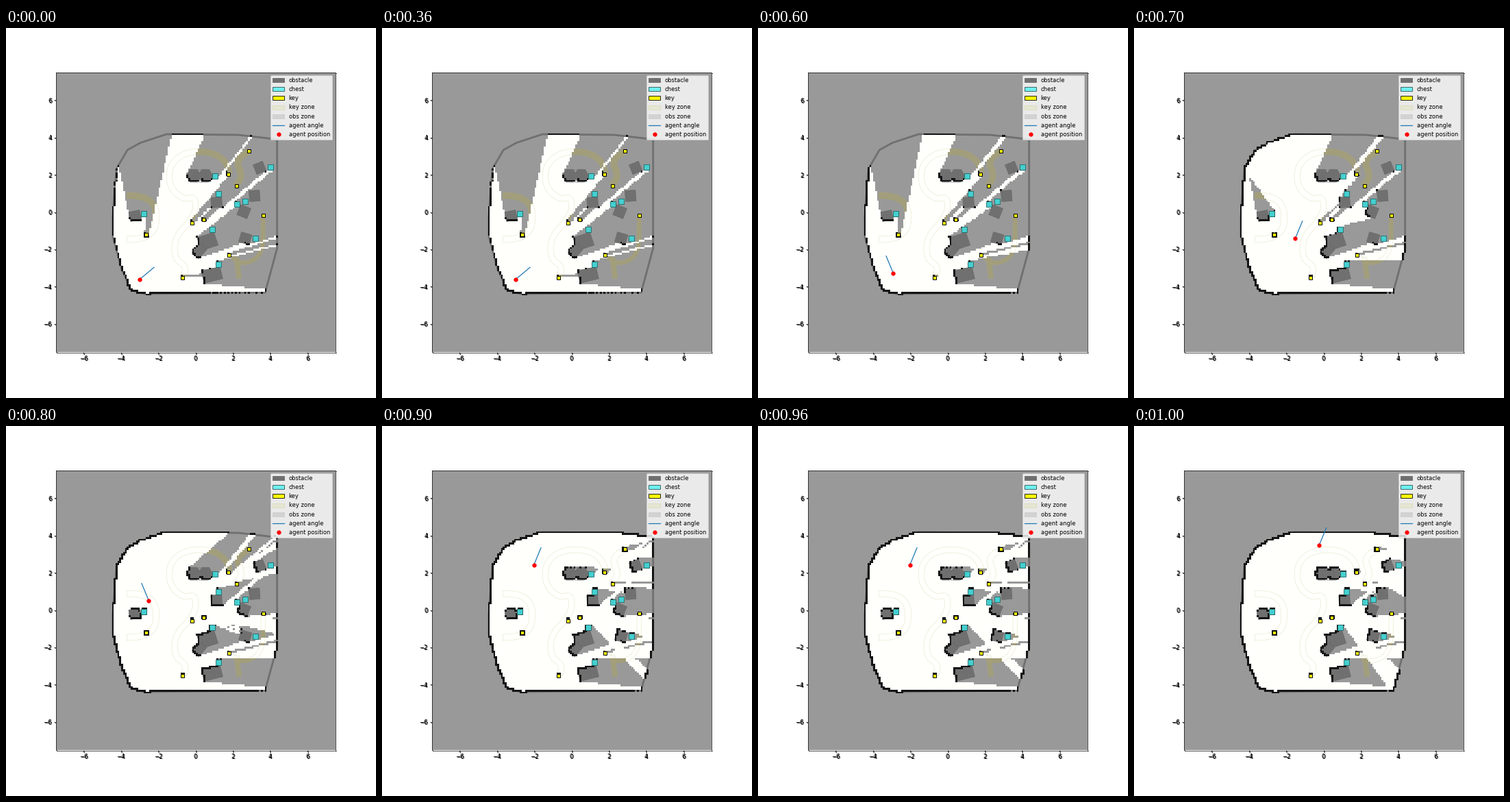
A matplotlib script that plays this animation: 540 px wide and 540 px high, repeating every 1100 ms.

```python
import numpy as np
import matplotlib.pyplot as plt
from matplotlib.animation import FuncAnimation
from matplotlib.lines import Line2D
from matplotlib.patches import Patch, Polygon
from matplotlib.path import Path

HALF, CELL, PX, N = 7.5, 0.1, 27.2, 150
GREY = "#707070"


def world(points):
    """Stage pixels to map units."""
    p = np.array(points, float)
    return np.column_stack([(p[:, 0] - 277.3) / PX, (269 - p[:, 1]) / PX])


def box(cx, cy, w, h, deg=0):
    """Turned rectangle, centre and size in stage pixels."""
    a = np.radians(deg)
    x = np.array([-1, 1, 1, -1]) * w / 2
    y = np.array([-1, -1, 1, 1]) * h / 2
    return world(np.column_stack([cx + x * np.cos(a) - y * np.sin(a),
                                  cy - x * np.sin(a) - y * np.cos(a)]))


def arc(cx, cy, rx, ry, start, end, power=1.0):
    """Points on a (super)ellipse, counter-clockwise on screen."""
    t = np.radians(np.linspace(start, end, 25))
    c, s = np.cos(t), np.sin(t)
    return list(zip(cx + rx * np.sign(c) * abs(c) ** power,
                    cy - ry * np.sign(s) * abs(s) ** power))


def hexagon(cx, cy, r):
    t = np.arange(6) * np.pi / 3
    return world(np.column_stack([cx + r * np.cos(t), cy + r * np.sin(t)]))


def band(points, width):
    """Ribbon polygon around a corner-cut path."""
    p = world(points)
    for _ in range(3):
        a, b = p[:-1], p[1:]
        cut = np.stack([0.75 * a + 0.25 * b, 0.25 * a + 0.75 * b], 1).reshape(-1, 2)
        p = np.vstack([p[:1], cut, p[-1:]])
    d = np.gradient(p, axis=0)
    d /= np.hypot(d[:, 0], d[:, 1])[:, None]
    side = np.column_stack([-d[:, 1], d[:, 0]]) * width / 2 / PX
    return np.vstack([p + side, (p - side)[::-1]])


room = world([(235, 155.5), (340, 156.5), (396.5, 163), (396.5, 322), (379, 386.5),
              (203, 388.5), (183, 383), (169.5, 352), (156.5, 304), (156.5, 277),
              (162, 206), (178, 178.5), (197, 168)])

blocks = [
    box(189, 274.5, 16, 14, 12), box(308, 255, 16, 15, 3), box(348, 268.5, 16, 16, -22),
    box(363.5, 245.5, 15.5, 16, 4), box(371, 204.5, 15, 15, 22),
    box(350, 307.5, 16, 15, -16), box(301.5, 361, 28, 18, 14),
    box(295, 312, 26, 20, 18), box(283, 326, 18, 13.5, 48),
    hexagon(274.5, 216, 10.5), hexagon(292, 216, 10.5), box(283.5, 216, 16, 9),
]

chests = [(202, 271.5), (306, 216.5), (311, 242), (338, 257.5), (350, 253),
          (386.5, 203.5), (301.5, 294.5), (365, 307.5), (311, 345.5)]
keys = [(205, 302.3), (272, 284.8), (289, 280), (325.5, 213.8), (337, 230.8),
        (355, 180), (376, 274.3), (326, 331.5), (258.7, 364.6)]

zones = [
    band(arc(177, 277, 43, 32, 90, -90, 0.75), 9),
    band(arc(283, 217, 44, 36, 5, 245, 0.9)
         + [(278, 247), (277, 275), (247, 305), (247, 338), (264, 348), (260, 364)], 8.5),
    band([(337, 230), (346, 216), (336, 194), (355, 180)], 9),
    band([(326, 331), (345, 347), (376, 332), (376, 278)], 6),
    band([(337, 335), (341, 366)], 7),
]

stops = world([(196, 367.3), (198.2, 358.4), (236.2, 307.5),
               (209.2, 255.4), (222.4, 203.4), (271, 174.4)])
headings = np.radians([40, 112.5, 67.5, 112.5, 67.5, 67.5])


def cells_in(shape):
    """For every cell: how many of four points near its corners lie inside."""
    c = -HALF + CELL * (np.arange(N) + 0.5)
    count = 0
    for dx in (-0.04, 0.04):
        for dy in (-0.04, 0.04):
            gx, gy = np.meshgrid(c + dx, c + dy)
            pts = np.column_stack([gx.ravel(), gy.ravel()])
            count = count + Path(shape).contains_points(pts).astype(int)
    return count.reshape(N, N)


def scan(pos):
    """Cast rays all round and mark the cells they cross and strike."""
    ang = np.linspace(0, 2 * np.pi, 1080, endpoint=False)[:, None]
    r = np.arange(0, 11, 0.04)[None, :]
    ix = ((pos[0] + r * np.cos(ang) + HALF) / CELL).astype(int).clip(0, N - 1)
    iy = ((pos[1] + r * np.sin(ang) + HALF) / CELL).astype(int).clip(0, N - 1)
    stop = solid[iy, ix].argmax(axis=1)
    clear = np.arange(r.size)[None, :] < stop[:, None]
    free[iy[clear], ix[clear]] = True
    rows = np.arange(len(ang))
    hit[iy[rows, stop], ix[rows, stop]] = True


def layer(mask, color):
    img = np.zeros((N, N, 4))
    img[mask] = (*color, 1)
    return img


solid = cells_in(room) < 4
for shape in blocks + [box(*k, 5, 5) for k in keys] + [box(*c, 7, 7) for c in chests]:
    solid |= cells_in(shape) > 0

# The agent keeps scanning on its way from stop to stop
free, hit = np.zeros((2, N, N), bool)
views = []
for i, here in enumerate(stops):
    last = stops[max(0, i - 1)]
    for t in np.linspace(0, 1, 7)[1:]:
        scan(last + t * (here - last))
    views.append((layer(free, (1, 1, 0.99)), layer(hit, (0.08, 0.08, 0.08))))

fig = plt.figure(figsize=(9, 9), dpi=60, facecolor="white")
ticks = range(-6, 7, 2)
# Two axes one pixel apart give the doubled labels and the heavy lower right edge
for shift, face in ((0.5, "white"), (-0.5, "#999999")):
    ax = fig.add_axes([(73 + shift) / 540, (67 - shift) / 540, 408 / 540, 408 / 540])
    ax.set(xlim=(-HALF, HALF), ylim=(-HALF, HALF), xticks=ticks, yticks=ticks,
           facecolor=face)
ax.spines[["right", "bottom"]].set_visible(False)


def add(shape, z, **style):
    ax.add_patch(Polygon(shape, zorder=z, **style))


grid = dict(extent=(-HALF, HALF, -HALF, HALF), origin="lower",
            interpolation="nearest", aspect="auto")
free_img = ax.imshow(views[0][0], zorder=2, **grid)
hit_img = ax.imshow(views[0][1], zorder=5, **grid)

for z in zones:
    add(z, 1, fc="#a29e7b", ec="none")
    add(z, 3, fc="none", ec="#b8b060", lw=0.8, alpha=0.28)
add(room, 1.5, fc="none", ec=GREY, lw=3.4)
add(box(283, 216, 26, 20), 3, fc="#808080", ec="none", alpha=0.35)
for b in blocks:
    add(b, 4, fc=GREY, ec="#686868", lw=0.7)
for c in chests:
    add(box(*c, 8, 8), 6, fc="#45cfcf", ec="#1f6666", lw=1)
for k in keys:
    add(box(*k, 5, 5), 6, fc="yellow", ec="black", lw=1.2)

ray, = ax.plot([], [], color="C0", lw=1.5, zorder=7)
dot, = ax.plot([], [], "ro", ms=6.5, zorder=8)

legend = ax.legend(handles=[
    Patch(fc=GREY, ec="#686868", label="obstacle"),
    Patch(fc="#70f0f0", ec="#2c5555", label="chest"),
    Patch(fc="yellow", ec="black", label="key"),
    Patch(fc="#e6e6d4", ec="#dcdcb8", label="key zone"),
    Patch(fc="#d3d3d3", ec="#cccccc", label="obs zone"),
    Line2D([], [], color="C0", lw=1.5, label="agent angle"),
    Line2D([], [], color="red", marker="o", ms=6.5, ls="none", label="agent position"),
], loc="upper right")
legend.set_zorder(10)


def draw(i):
    step = max(0, i - 5)
    (x, y), a = stops[step], headings[step]
    free_img.set_data(views[step][0])
    hit_img.set_data(views[step][1])
    ray.set_data([x, x + np.cos(a)], [y, y + np.sin(a)])
    dot.set_data([x], [y])
    return free_img, hit_img, ray, dot


anim = FuncAnimation(fig, draw, frames=11, interval=100, repeat=True, repeat_delay=0)
plt.show()
```
